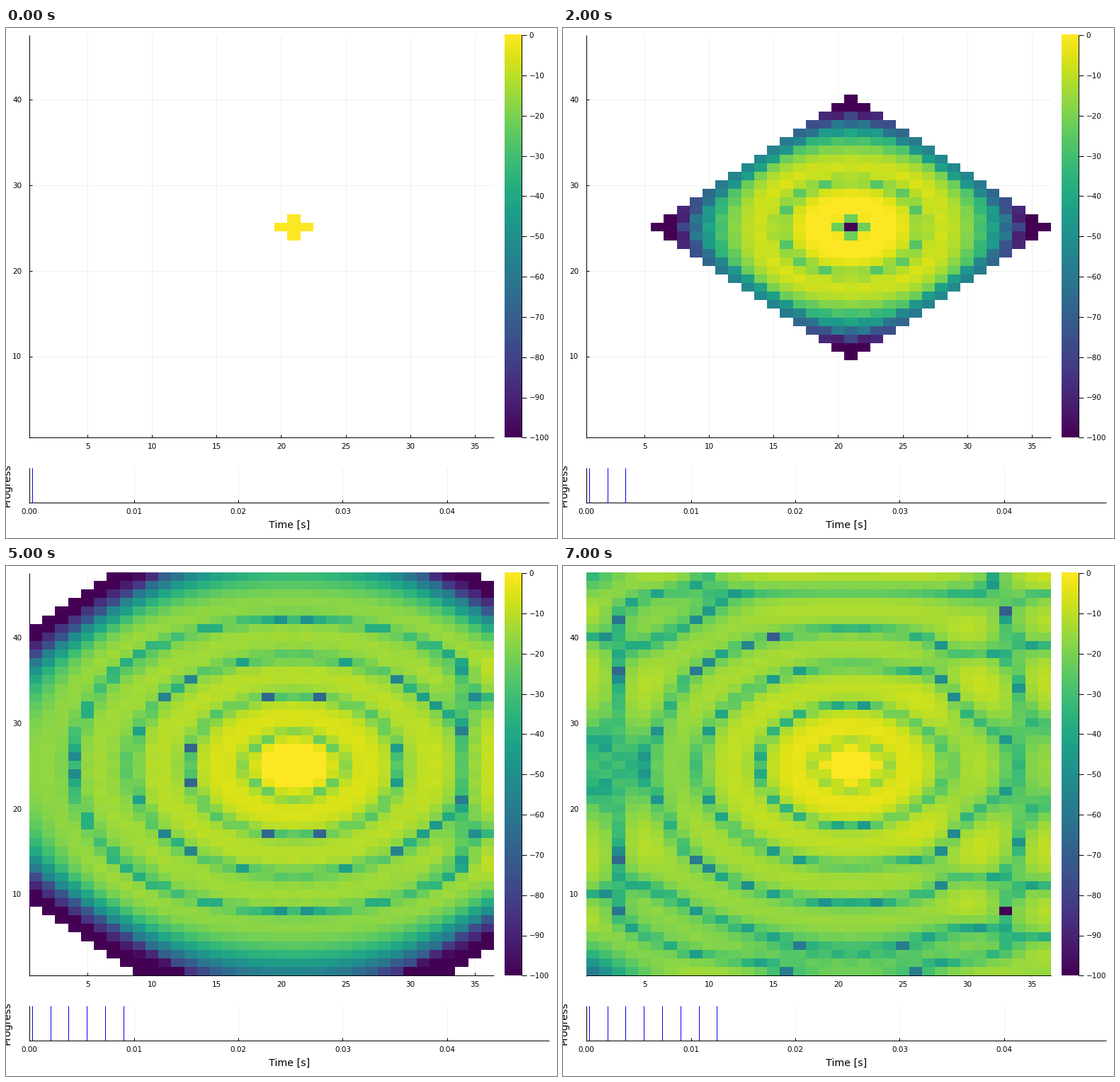
A matplotlib script that plays this animation: 778x720 px, repeating every 8 s.

```python
import numpy as np
import matplotlib.pyplot as plt
from matplotlib.animation import FuncAnimation

W, H, DPI = 778, 720, 100
PX = 72 / DPI                      # one pixel in points
TICK, LABEL = 10.4 * PX, 14.3 * PX

# Acoustic field: grid, time step and emitter
NX, NY, DEPTH = 36, 47, 28
DT, DX, C, FREQ, AMP = 0.00025, 0.15, 343, 250, 10
EMITTER = (20, 24, 0)
FRAMES, STEPS = 8, 7

# Layout in pixels
LEFT, RIGHT, TOP, BOTTOM = 33.2, 689, 10.2, 578.4
BAR_L, BAR_R = 704.5, 728
P_TOP, P_BOTTOM, P_RIGHT = 620.8, 670.4, 767
T_SCALE = 14740
GRID = "#f0f0f0"


def simulate():
    """Return the level in dB of the emitter plane for every frame."""
    courant2 = (C * DT / DX) ** 2
    p = np.zeros((NX, NY, DEPTH))
    old = p.copy()
    levels = []
    for n in range(2, 3 + STEPS * (FRAMES - 1)):
        p[EMITTER] = AMP * np.sin(2 * np.pi * FREQ * n * DT)
        q = np.pad(p, 1, mode="edge")       # rigid walls
        q[:, :, 0] = q[:, :, 2]             # mirror at the emitter plane
        near = (q[2:, 1:-1, 1:-1] + q[:-2, 1:-1, 1:-1]
                + q[1:-1, 2:, 1:-1] + q[1:-1, :-2, 1:-1]
                + q[1:-1, 1:-1, 2:] + q[1:-1, 1:-1, :-2])
        new = 2 * p - old + courant2 * (near - 6 * p)
        new[EMITTER] = p[EMITTER]
        old, p = p, new
        if (n - 2) % STEPS == 0:
            with np.errstate(divide="ignore"):
                db = 20 * np.log10(np.abs(p[:, :, 0].T))
            levels.append(np.ma.masked_invalid(db))
    return levels


def x_cell(v):
    return LEFT + (v - 0.5) * (RIGHT - LEFT) / NX


def y_cell(v):
    return BOTTOM - (v - 0.5) * (BOTTOM - TOP) / NY


def x_time(t):
    return LEFT + t * T_SCALE


fig = plt.figure(figsize=(W / DPI, H / DPI), dpi=DPI, facecolor="white")
ax = fig.add_axes([0, 0, 1, 1])


def line(x0, y0, x1, y1, color="black", z=1.0):
    return ax.plot([x0, x1], [y0, y1], color=color, lw=PX, zorder=z,
                   solid_capstyle="butt")[0]


def text(x, y, s, size=TICK, ha="center", **kw):
    ax.text(x, y, s, fontsize=size, ha=ha, va="baseline",
            family="DejaVu Sans", **kw)


def number(x, y, s, ha="center"):
    text(x, y + 3.9, s, ha=ha)


# Main plot axes, beneath the heatmap
for v in range(5, 36, 5):
    x = x_cell(v)
    line(x, TOP, x, BOTTOM, GRID, 0.5)
    line(x, BOTTOM, x, BOTTOM - 4)
    number(x, 590.5, str(v))
for v in range(10, 41, 10):
    y = y_cell(v)
    line(LEFT, y, RIGHT, y, GRID, 0.5)
    line(LEFT, y, LEFT + 4, y)
    number(22.3, y, str(v), "right")
line(LEFT, TOP, LEFT, BOTTOM + 0.5)
line(LEFT, BOTTOM, RIGHT, BOTTOM)

# Colour bar
ax.imshow(np.linspace(0, 1, 256)[:, None], cmap="viridis", origin="lower",
          extent=(BAR_L, BAR_R, BOTTOM, TOP), aspect="auto", zorder=2)
line(BAR_R, TOP, BAR_R, BOTTOM, z=3)
for i in range(11):
    y = TOP + i * (BOTTOM - TOP) / 10
    line(BAR_R, y, BAR_R + 7.5, y, z=3)
    number(738.6, y, f"\u2212{10 * i}" if i else "0", "left")

# Progress strip
for i in range(5):
    x = x_time(i / 100)
    if i:
        line(x, P_TOP, x, P_BOTTOM, GRID, 0.5)
        line(x, P_BOTTOM, x, P_BOTTOM - 4.5)
    number(x, 682.5, f"{i / 100:.2f}")
line(LEFT, P_TOP, LEFT, P_BOTTOM + 0.5)
line(LEFT, P_BOTTOM, P_RIGHT, P_BOTTOM)
text(400.5, 705.5, "Time [s]", LABEL)
text(6, 645.5, "Progress", LABEL, rotation=90, rotation_mode="anchor")

levels = simulate()
heat = ax.imshow(levels[0], cmap="viridis", vmin=-100, vmax=0, origin="lower",
                 extent=(LEFT, RIGHT, BOTTOM, TOP), aspect="auto",
                 interpolation="nearest", zorder=2)
marks = []
for i in range(FRAMES):
    x = x_time((1 + STEPS * i) * DT)
    marks.append(line(x, P_TOP, x, P_BOTTOM, "blue", 3))

ax.set_xlim(0, W)
ax.set_ylim(H, 0)
ax.axis("off")


def draw(i):
    heat.set_data(levels[i])
    for k, mark in enumerate(marks):
        mark.set_visible(k <= i)
    return [heat, *marks]


anim = FuncAnimation(fig, draw, frames=FRAMES, interval=1000, repeat=True,
                     repeat_delay=0)
plt.show()
```
